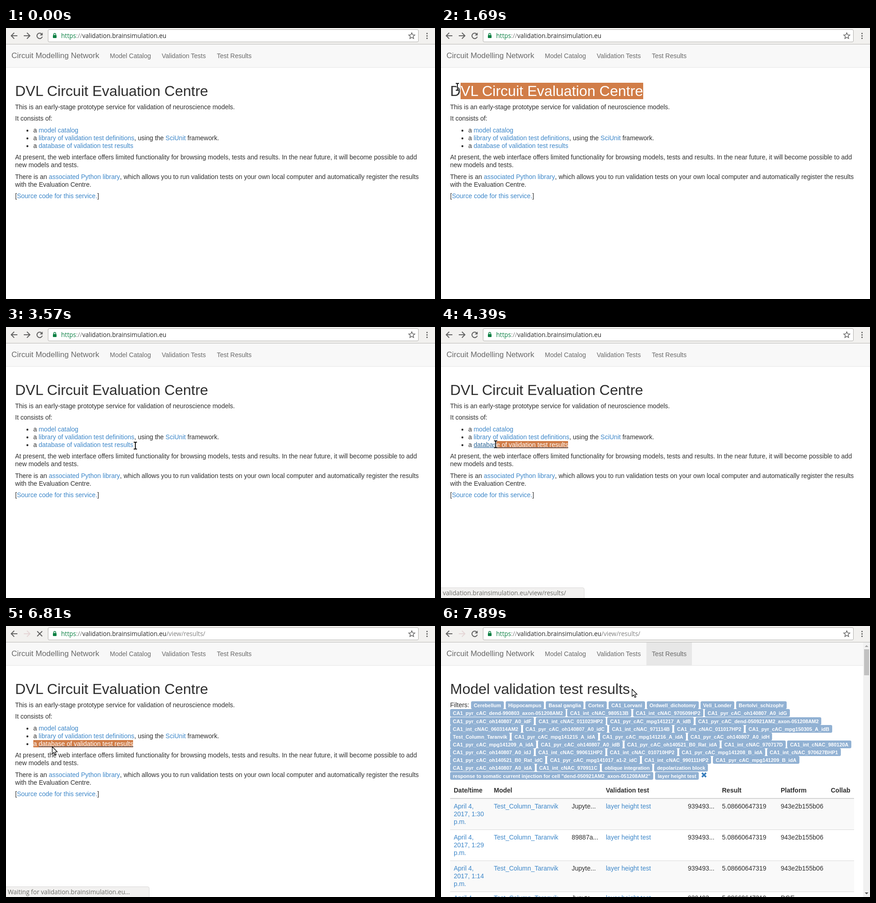
Write an HTML page that moves like this. It is 942 by 594 pixels and loops after 7990 ms.

```html
<!DOCTYPE html>
<html lang="en">
<head>
<meta charset="utf-8">
<title>Model validation</title>
<style>
html, body { margin: 0; width: 100%; height: 100%; overflow: hidden; background: #fff; }
#stage { position: relative; width: 942px; height: 594px; overflow: hidden; font: 14px/16px "Liberation Sans", Arial, sans-serif; color: #2e2e2e; }
#stage > *, .page, .page > * { position: absolute; margin: 0; white-space: nowrap; }
.page, svg { left: 0; top: 0; width: 942px; height: 594px; }
/* inline-block keeps kerning from crossing the link's edge */
a { display: inline-block; color: #3d87c9; }
a.hover { color: #2a6496; text-decoration: underline; }
.title { font-size: 32px; line-height: 36px; margin-top: -10px !important; }
.nav { color: #696969; }
.brand { font-size: 17px; line-height: 20px; margin-top: -2px !important; }
.bold { font-weight: bold; }
.sel, .sel a { background: #d17d48; color: #fff; }
.sel a.hover { color: #fff; text-decoration-color: #2a6496; }
#bar { left: 0; top: 0; width: 942px; height: 35px; background: #f2f1ef; border-bottom: 1px solid #b9b8b6; }
#box { left: 92px; top: 3px; width: 812px; height: 26px; background: #fff; border: 1px solid #b1afac; border-radius: 3px; }
#navbar { left: 0; top: 36px; width: 942px; height: 50px; background: #f8f8f8; border-bottom: 1px solid #e7e7e7; }
.ui { font: 13.6px/18px "Open Sans", "Noto Sans", sans-serif; }
#url, #path { top: 8px; color: #808080; }
#url { left: 121px; }
#url b { font-weight: 400; color: #0b8043; }
#url i { font-style: normal; color: #282828; }
#path { left: 352px; }
#status { left: -1px; bottom: -1px; width: 310px; height: 22px; padding-left: 4px; line-height: 22px; background: #f2f1f0; border: 1px solid #dad9d8; border-radius: 0 4px 0 0; color: #6c6c67; }
#tags { left: 20px; top: 165.3px; line-height: 17.14px; }
#tags b { font-size: 11px; line-height: 1; padding: 3px 6px 2px; border-radius: 3px; background: #91b1d3; color: #fff; }
.row { left: 20px; width: 887px; height: 67px; border-bottom: 1px solid #d9d9d9; }
.row.odd { background: #f9f9f9; }
#rule { left: 20px; top: 377px; width: 887px; height: 2px; background: #d4d4d4; }
#tab { left: 451px; top: 36px; width: 100px; height: 50px; background: #e7e7e7; }
#track { left: 927px; top: 36px; width: 15px; height: 558px; background: #f1f1f1; }
#thumb { left: 929px; top: 51px; width: 11px; height: 57px; background: #c1c1c1; }
</style>
</head>
<body>
<div id="stage">
  <div id="navbar"></div>
  <div class="page" id="home"></div>
  <div class="page" id="results"></div>
  <div id="bar"></div>
  <div id="box"></div>
  <div id="url" class="ui"><b>https</b>://<i>validation.brainsimulation.eu</i></div>
  <div id="path" class="ui">/view/results/</div>
  <svg fill="none" stroke="#626262" stroke-width="2">
    <path d="M25 17H12M18 10.5L11.5 17l6.5 6.5"/>
    <path id="forward" d="M39 17H52M46 10.5L52.5 17 46 23.5"/>
    <g id="reload"><path d="M78.3 13A6 6 0 1 0 79.7 19"/><path d="M80.5 10v6.3h-6.3z" fill="#626262" stroke="none"/></g>
    <path id="stop" d="M68.5 11.5l11 11m0-11l-11 11"/>
    <path d="M104.8 16v-2a2.2 2.2 0 0 1 4.4 0v2" stroke="#0b8043" stroke-width="1.5"/>
    <rect x="103" y="15.5" width="8" height="6.5" rx="1" fill="#0b8043" stroke="none"/>
    <path d="M891 10.5l1.9 4.4 4.8.4-3.6 3.1 1.1 4.7-4.2-2.5-4.2 2.5 1.1-4.7-3.6-3.1 4.8-.4z" stroke-width="1.4"/>
    <path d="M924.5 12v.01M924.5 17.3v.01M924.5 22.6v.01" stroke-width="3.2" stroke-linecap="round"/>
  </svg>
  <div id="status" class="ui"></div>
  <svg id="cursor" style="overflow:visible" fill="#fff" stroke="#000" stroke-width="1.2" stroke-linejoin="round">
    <g id="beam" fill="none">
      <path d="M-3.5-7.5h2.5l1 1 1-1h2.5M0-6.5v13M-3.5 7.5h2.5l1-1 1 1h2.5" stroke="#fff" stroke-width="3.6"/>
      <path d="M-3.5-7.5h2.5l1 1 1-1h2.5M0-6.5v13M-3.5 7.5h2.5l1-1 1 1h2.5" stroke-width="1.8"/>
    </g>
    <g id="hand" transform="translate(-6 -2)">
      <path d="M4.5 9.5V2.5Q4.5 1 6 1T7.5 2.5V6.3Q9.3 5.4 10 7 11.6 6.1 12.4 7.6 14.7 7 14.7 9.3V12Q14.7 14 13.2 16.5H6Q4.5 14 1.3 10.6 1 8.9 2.5 8.7 3.7 8.8 4.5 10.5Z"/>
      <path d="M7.5 6.3v3M10 7v2.5M12.4 7.6v2" fill="none"/>
    </g>
    <path id="arrow" d="M.5.5V16.3l3.6-3.2 2.5 5.5 2.6-1.1-2.5-5.5h5z"/>
  </svg>
</div>
<script>
const LOOP = 7990;
const el = id => document.getElementById(id);
const link = (text, id = '') => `<a id="${id}">${text}</a>`;
const line = (x, y, html, cls = '', id = '') =>
  `<p id="${id}" class="${cls}" style="left:${x}px;top:${y - 8}px">${html}</p>`;
const lines = list => list.map(args => line(...args)).join('');

const HEADING = 'DVL Circuit Evaluation Centre';
const DATABASE = 'database of validation test results';
const nav = lines([
  [12, 61, 'Circuit Modelling Network', 'nav brand'],
  [228, 61, 'Model Catalog', 'nav'],
  [342, 61, 'Validation Tests', 'nav'],
  [463, 61, 'Test Results', 'nav'],
]);

el('home').innerHTML = nav + lines([
  [20, 138, HEADING, 'title'],
  [20, 138, HEADING, 'title sel', 'selTitle'],
  [20, 173, 'This is an early-stage prototype service for validation of neuroscience models.'],
  [20, 198, 'It consists of:'],
  [60, 224, 'a ' + link('model catalog')],
  [60, 241, `a ${link('library of validation test definitions', 'library')}, using the ${link('SciUnit')} framework.`],
  [60, 258, 'a ' + link(DATABASE, 'database')],
  [60, 258, 'a ' + link(DATABASE, 'databaseSel'), 'sel', 'selItem'],
  [20, 283, 'At present, the web interface offers limited functionality for browsing models, tests and results. In the near future, it will become possible to add'],
  [20, 300, 'new models and tests.'],
  [20, 326, `There is an ${link('associated Python library')}, which allows you to run validation tests on your own local computer and automatically register the results`],
  [20, 343, 'with the Evaluation Centre.'],
  [20, 368, `[${link('Source code for this service.')}]`],
]) + '<svg fill="#333">' + [225, 242, 259].map(y => `<circle cx="47" cy="${y}" r="2.2"/>`).join('') + '</svg>';

// p: and i: stand for the two common cell prefixes
const tags = `Cerebellum,Hippocampus,Basal ganglia,Cortex,CA1_Lorvani,Ordwell_dichotomy,Veli_Londer,Bertolvi_schizophr
p:dend-990803_axon-051208AM2,i:980513B,i:970509HP2,p:oh140807_A0_idG
p:oh140807_A0_idF,i:011023HP2,p:mpg141217_A_idB,p:dend-050921AM2_axon-051208AM2
i:060314AM2,p:oh140807_A0_idC,i:971114B,i:011017HP2,p:mpg150305_A_idB
Test_Column_Taranvik,p:mpg141215_A_idA,p:mpg141216_A_idA,p:oh140807_A0_idH
p:mpg141209_A_idA,p:oh140807_A0_idB,p:oh140521_B0_Rat_idA,i:970717D,i:980120A
p:oh140807_A0_idJ,i:990611HP2,i:010710HP2,p:mpg141208_B_idA,i:970627BHP1
p:oh140521_B0_Rat_idC,p:mpg141017_a1-2_idC,i:990111HP2,p:mpg141209_B_idA
p:oh140807_A0_idA,i:970911C,oblique integration,depolarization block
response to somatic current injection for cell "dend-050921AM2_axon-051208AM2",layer height test`
  .replace(/p:/g, 'CA1_pyr_cAC_').replace(/i:/g, 'CA1_int_cNAC_')
  .split('\n').map(row => row.split(',').map(tag => `<b>${tag}</b>`).join(' ')).join('<br>');

const headers = [[28, 'Date/time'], [116, 'Model'], [362, 'Validation test'], [617, 'Result'], [746, 'Platform'], [856, 'Collab']];
const runs = [
  [395, '1:30', 'Jupyte...', '943e2b155b06'],
  [463, '1:29', '89887a...', '943e2b155b06'],
  [531, '1:14', 'Jupyte...', '943e2b155b06'],
  [596, '1:12', 'Jupyte...', 'DGE'],
];
const tableRow = ([y, time, run, platform], i) =>
  `<div class="row ${i % 2 ? '' : 'odd'}" style="top:${379 + 68 * i}px"></div>` + lines([
    [28, y, link('April 4,')],
    [28, y + 17, link(`2017, ${time}`)],
    [28, y + 34, link('p.m.')],
    [116, y, link('Test_Column_Taranvik')],
    [287, y, run],
    [362, y, link('layer height test')],
    [542, y, '939493...'],
    [617, y, '5.08660647319'],
    [746, y, platform],
  ]);

el('results').innerHTML = '<div id="tab"></div>' + nav +
  line(20, 138, 'Model validation test results', 'title') +
  `<div id="tags">Filters: ${tags}</div>` +
  headers.map(([x, text]) => line(x, 360, text, 'bold')).join('') +
  runs.map(tableRow).join('') +
  `<div id="rule"></div><div id="track"></div><div id="thumb"></div>
  <svg><path d="M573 322l9 9m0-9l-9 9" stroke="#3a7fbd" stroke-width="3.6"/>
  <path d="M930.5 46l4-4 4 4z" fill="#a3a3a3"/><path d="M930.5 584l4 4 4-4z" fill="#505050"/></svg>`;

// keys: [time, value, ...]; linear between neighbours
function track(keys, t) {
  const next = keys.findIndex(key => key[0] > t);
  if (next < 0) return keys[keys.length - 1].slice(1);
  if (!next) return keys[0].slice(1);
  const a = keys[next - 1], b = keys[next], k = (t - a[0]) / (b[0] - a[0]);
  return a.slice(1).map((v, i) => v + (b[i + 1] - v) * k);
}

const pointer = [
  [580, 451, 130], [1360, 90, 128], [1690, 36, 129], [1980, 27, 130], [2390, 27, 130],
  [2880, 262, 252], [2990, 266, 254], [3160, 283, 256], [3200, 285, 257], [3240, 291, 257],
  [3380, 291, 257], [3400, 284, 260], [3600, 284, 260], [4630, 71, 256], [4960, 61, 255],
  [5350, 61, 255], [5750, 101, 264], [7150, 101, 264], [7590, 488, 133], [7890, 419, 138],
];
const statusFade = [
  [2830, 0], [3060, 1], [3380, 1], [3550, 0], [3750, 0], [3870, 1],
  [4880, 1], [5080, 0], [5540, 0], [5700, 1], [7150, 1], [7350, 0],
];

const pen = document.createElement('canvas').getContext('2d');
// offset of the character edge nearest to x
function snap(text, size, x) {
  pen.font = `${size}px "Liberation Sans", Arial, sans-serif`;
  let left = 0;
  for (let i = 1; i <= text.length; i++) {
    const right = pen.measureText(text.slice(0, i)).width;
    if (x < (left + right) / 2) break;
    left = right;
  }
  return left;
}

const show = (id, on) => { el(id).style.display = on ? '' : 'none'; };
const select = (id, offset) => { el(id).style.clipPath = `inset(0 0 0 ${offset}px)`; };

function draw() {
  const t = performance.now() % LOOP;
  const between = (a, b) => t >= a && t < b;
  const [x, y] = track(pointer, t);
  const loaded = t >= 6850, loading = between(5990, 6890);

  show('home', !loaded);
  show('results', loaded);
  show('path', t >= 6810);
  show('stop', loading);
  show('reload', !loading);
  el('forward').setAttribute('stroke', t >= 6810 ? '#e5d6d6' : '#626262');

  show('selTitle', between(580, 3380));
  select('selTitle', snap(HEADING, 32, track(pointer, Math.min(t, 2000))[0] - 20));
  show('selItem', t >= 3570);
  select('selItem', snap('a ' + DATABASE, 14, track(pointer, Math.min(t, 5350))[0] - 60));

  const overLink = t >= 580 && x > 72 && x < 280;
  const onDatabase = overLink && y >= 250 && y < 267;
  const onLibrary = overLink && y >= 233 && y < 250;
  el('library').className = onLibrary ? 'hover' : '';
  el('database').className = el('databaseSel').className = onDatabase ? 'hover' : '';

  const arrow = t >= 5990 || between(3160, 3380);
  const hand = !arrow && (onDatabase || onLibrary) && !between(3380, 5350);
  show('cursor', t >= 580);
  show('arrow', arrow);
  show('hand', hand);
  show('beam', !arrow && !hand);
  el('cursor').style.transform = `translate(${Math.round(x)}px, ${Math.round(y)}px)`;

  el('status').style.opacity = track(statusFade, t)[0];
  el('status').textContent = t < 6200
    ? 'validation.brainsimulation.eu/view/results/'
    : 'Waiting for validation.brainsimulation.eu…';
  requestAnimationFrame(draw);
}
draw();
</script>
</body>
</html>
```
